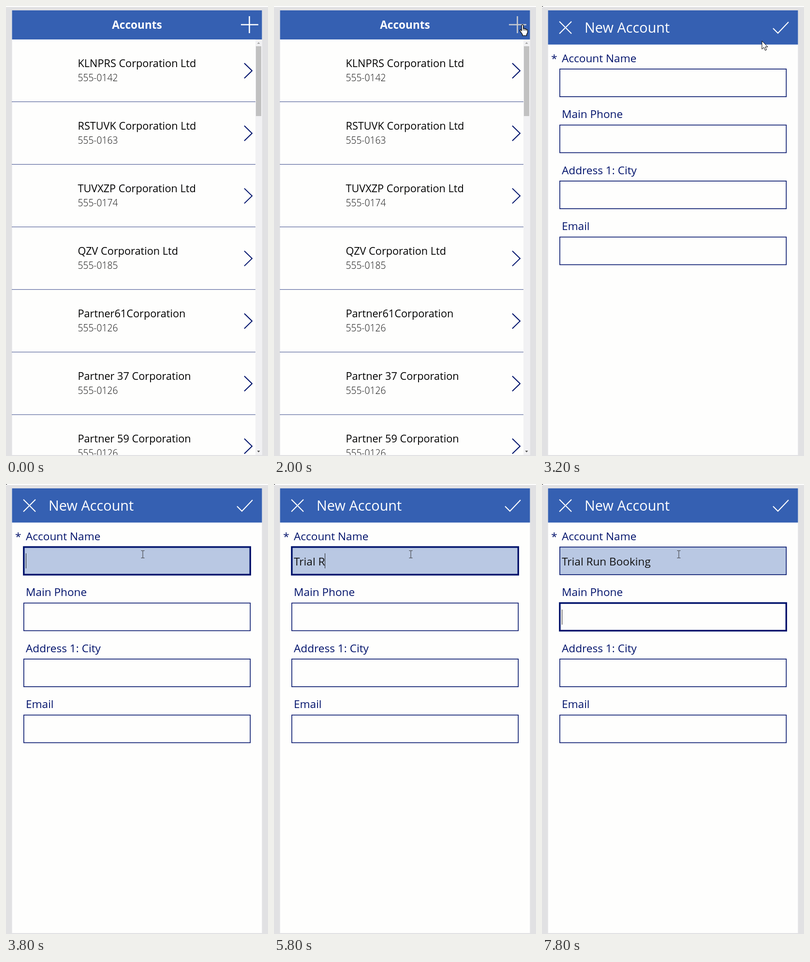
Animation of 542 by 928 pixels, one loop 8 s. Source, as an HTML page:

```html
<!DOCTYPE html>
<html lang="en">
<head>
<meta charset="utf-8">
<title>New account form</title>
<style>
html, body { margin: 0; width: 542px; height: 928px; overflow: hidden; background: #e1e1e3; }
svg { display: block; font-family: "Open Sans", sans-serif; }
.bar { fill: #3560b2; }
.icon { fill: none; stroke: #fff; stroke-width: 2; }
.navy { fill: none; stroke: #00126b; }
.heading { font-size: 22.6px; font-weight: 700; fill: #fff; }
.title { font-size: 28.9px; fill: #fff; }
.name { font-size: 21.7px; font-weight: 500; fill: #000; }
.phone { font-size: 19.2px; font-weight: 300; fill: #111; }
.label { font-size: 22.6px; fill: #00126b; }
.value { font-size: 22.6px; fill: #111; }
</style>
</head>
<body>
<svg width="542" height="928" viewBox="0 0 542 928">
  <rect width="542" height="928" fill="#e1e1e3"/>
  <rect width="542" height="2" fill="#fff"/>
  <rect x="12.5" y="9" width="517" height="917" fill="#fefefd"/>
  <rect id="dot" width="2" height="1"/>

  <g id="list">
    <clipPath id="page"><rect x="12" y="69" width="504" height="857"/></clipPath>
    <g id="rows" clip-path="url(#page)"></g>
    <rect class="bar" x="12.5" y="9" width="517" height="60"/>
    <text class="heading" x="271" y="46.5" text-anchor="middle">Accounts</text>
    <path id="plus" class="icon" d="M486 38.5h36M503.5 21v35" style="stroke-width:2.6"/>
    <rect x="516" y="69" width="13.5" height="857" fill="#f1f1f3"/>
    <rect x="517" y="83" width="11" height="144" fill="#c1c1c1"/>
    <path d="M519.5 78l3-3.5 3 3.5z" fill="#a3a3a3"/>
    <path d="M519.5 917l3 3.5 3-3.5z" fill="#505050"/>
  </g>

  <g id="form">
    <rect class="bar" x="12.5" y="9" width="517" height="70.5"/>
    <path class="icon" d="M36 32l25 25M61 32l-25 25M478 46l10 10 22-23"/>
    <text class="title" x="88" y="54.5">New Account</text>
    <text class="label" x="19" y="115.5">*</text>
    <g id="fields"></g>
    <text id="typed" class="value" x="41" y="167.5"></text>
    <path id="caret" stroke="#222" d="M.5 0v31"/>
  </g>

  <g id="arrow">
    <path d="M0 0v17l4-3.7 2.7 6.2 2.8-1.2-2.7-6H12z" fill="#fff" stroke="#000"/>
  </g>
  <g id="hand">
    <path d="M-1.7 1.6q1.7-2.6 3.4 0v7q2.2-1.3 3.2.8 2.2-.9 3.1 1 2.4-.3 2.6 1.9v4.2l-2 4.2v2.5h-8.600v-2.500l-5.200-7.500q-.8-2.400 1.600-2.200l1.900 2z" fill="#fff" stroke="#000" stroke-width="1.200"/>
    <path d="M1.700 8.500v4M4.900 9.500v3.500M8 10.500v3" stroke="#000"/>
  </g>
  <path id="beam" d="M-3.500-7.500h3l.5.5.5-.5h3M0-7v14M-3.500 7.500h3l.5-.5.500.500h3" fill="none" stroke="#333"/>
</svg>
<script>
const LOOP = 8000, STEP = 200, BLINK = 530;
const FOCUS = 3700, TYPING = 5400, NEXT_FIELD = 7800;
const VALUE = "Trial Run Booking";
// Letters present after each step of typing
const TYPED = [2, 4, 7, 8, 10, 11, 13, 14, 15, 17];
const ACCOUNTS = [
  ["KLNPRS Corporation Ltd", "555-0142"],
  ["RSTUVK Corporation Ltd", "555-0163"],
  ["TUVXZP Corporation Ltd", "555-0174"],
  ["QZV Corporation Ltd", "555-0185"],
  ["Partner61Corporation", "555-0126"],
  ["Partner 37 Corporation", "555-0126"],
  ["Partner 59 Corporation", "555-0126"]
];
const LABELS = ["Account Name", "Main Phone", "Address 1: City", "Email"];
// Pointer stops: time, shape, x, y
const POINTER = [
  [0, "", 0, 0],
  [1800, "arrow", 524, 42],
  [2000, "hand", 514, 38],
  [3200, "arrow", 455, 72],
  [3400, "beam", 320, 136],
  [3600, "beam", 283, 145]
];

const $ = id => document.getElementById(id);
const show = (id, on) => { $(id).style.display = on ? "" : "none"; };
const place = (id, x, y) => $(id).setAttribute("transform", `translate(${x} ${y})`);

$("rows").innerHTML = ACCOUNTS.map(([name, phone], i) => `
  <g transform="translate(0 ${i * 129.05})">
    <text class="name" x="148.500" y="125.500">${name}</text>
    <text class="phone" x="148.500" y="155">${phone}</text>
    <path class="navy" stroke-width="2" d="M493 118l16 15.500-16 15.500"/>
    <path d="M12 197.500h504" stroke="#3c4c8c"/>
  </g>`).join("");

$("fields").innerHTML = LABELS.map((label, i) => `
  <g transform="translate(0 ${i * 115.5})">
    <text class="label" x="41" y="115.500">${label}</text>
    <rect class="navy box" x="36.800" y="130" width="468.500" height="57"/>
  </g>`).join("");
const boxes = document.querySelectorAll(".box");

function draw(time) {
  const t = Math.floor(time % LOOP / STEP) * STEP;
  const onForm = t >= 2200;
  show("list", !onForm);
  show("form", onForm);
  show("dot", t >= 2800);
  $("plus").style.stroke = t >= 2000 ? "#c9cbd0" : "#fff";

  const [, shape, x, y] = POINTER.findLast(stop => stop[0] <= t);
  for (const id of ["arrow", "hand", "beam"]) show(id, id === shape);
  if (shape) place(shape, x, y);

  const active = t < FOCUS ? -1 : t < NEXT_FIELD ? 0 : 1;
  boxes.forEach((box, i) => {
    box.style.strokeWidth = i === active ? 3.4 : 1.6;
    box.style.fill = i === 0 && shape === "beam" ? "#b9c8e3" : "none";
  });

  const step = Math.floor((t - TYPING) / STEP);
  const count = step < 0 ? 0 : TYPED[Math.min(step, TYPED.length - 1)];
  const text = VALUE.slice(0, count);
  $("typed").textContent = text;

  const lit = step >= 0 || Math.floor((t - FOCUS) / BLINK) % 2 === 0;
  show("caret", active >= 0 && lit);
  if (active === 1) place("caret", 41, 259);
  else place("caret", 41 + (text ? Math.round($("typed").getComputedTextLength()) : 0), 143);
}

const start = performance.now();
function tick() {
  draw(performance.now() - start);
  requestAnimationFrame(tick);
}
tick();
</script>
</body>
</html>
```
